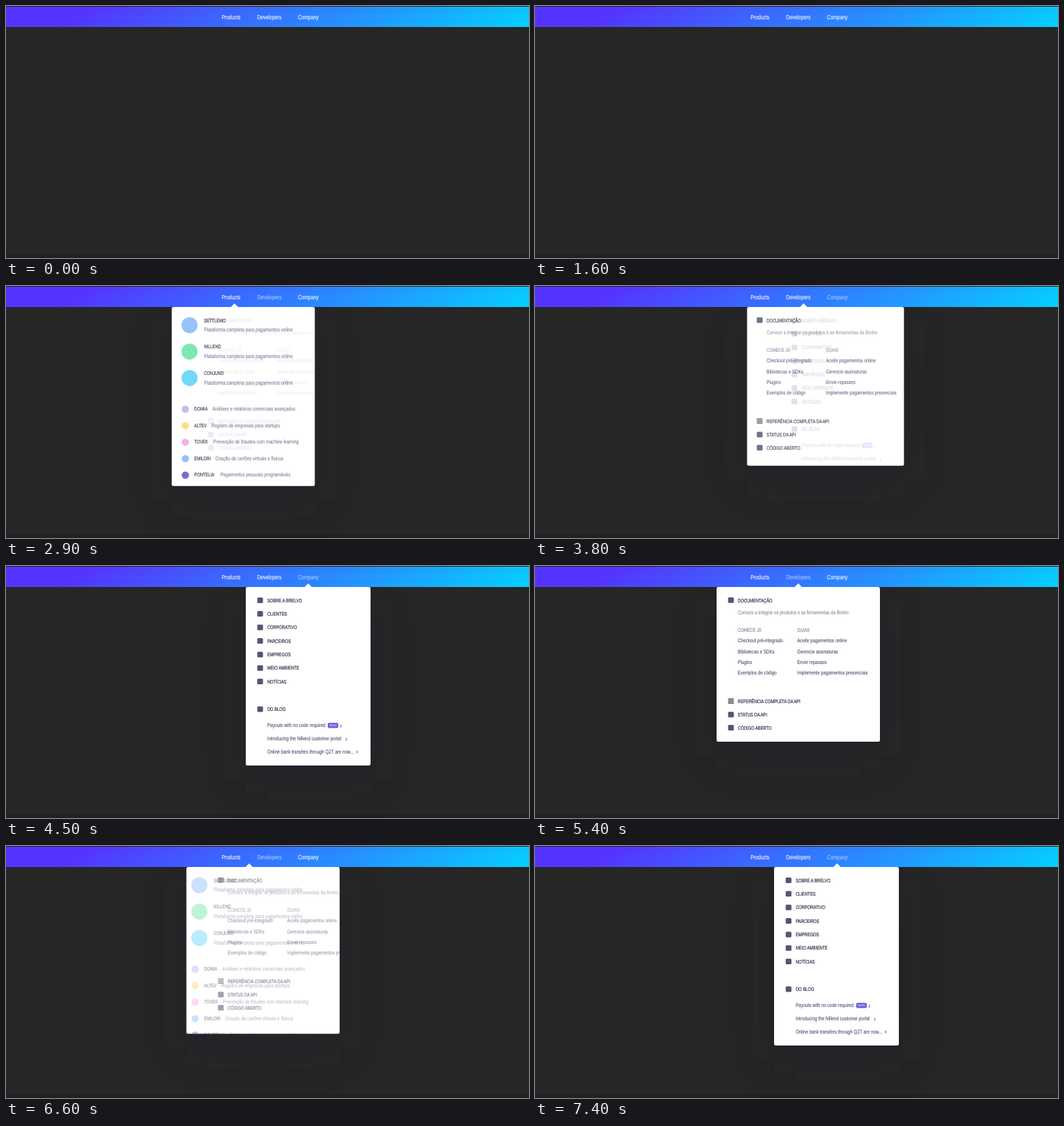
Animation of 746x360 px, one loop 7500 ms. Source, as an HTML page:

```html
<!DOCTYPE html>
<html lang="pt">
<head>
<meta charset="utf-8">
<title>Menu</title>
<style>
  html, body { margin: 0; width: 100%; height: 100%; overflow: hidden; background: #262626; }
  svg { display: block; width: 746px; height: 360px; }
  text {
    font-family: "Liberation Sans", Arial, sans-serif;
    text-rendering: geometricPrecision;
    white-space: pre;
  }
</style>
</head>
<body>
<svg id="stage" viewBox="0 0 746 360" xmlns="http://www.w3.org/2000/svg">
  <defs>
    <linearGradient id="sky" gradientUnits="userSpaceOnUse" x1="273.5" y1="-157" x2="472.5" y2="187">
      <stop offset=".15" stop-color="#53f"/>
      <stop offset="1" stop-color="#05d0ff"/>
    </linearGradient>
    <filter id="soft" filterUnits="userSpaceOnUse" x="0" y="0" width="746" height="360">
      <feGaussianBlur stdDeviation="32"/>
    </filter>
    <clipPath id="window"><rect id="clip" y="30" rx="2.5"/></clipPath>
  </defs>
  <rect width="746" height="360" fill="#262626"/>
  <rect y="355" width="746" height="5" fill="#212121"/>
  <g id="menu">
    <rect id="shadow" y="50" rx="4" fill="#1e1e32" opacity=".35" filter="url(#soft)"/>
  </g>
  <rect y="1" width="746" height="29" fill="url(#sky)"/>
  <g id="nav"></g>
  <g id="drop">
    <path id="arrow" d="M-5.5 30.5L-.8 25.6Q0 25 .8 25.6L5.5 30.5Z" fill="#fff"/>
    <rect id="panel" y="30" rx="2.5" fill="#fff"/>
    <g id="content" clip-path="url(#window)"></g>
  </g>
</svg>
<script>
const LOOP = 7500, STEP = 100, MOVE = 600, OPEN_AT = 1640, OPEN_TIME = 400, TOP = 30;
const CONDENSE = 0.78;
const INK = '#32324e', SLATE = '#525674', MUTED = '#82849c', LINK = '#46476c', DESC = '#66698a';
const $ = id => document.getElementById(id);

function add(parent, tag, attrs) {
  const node = document.createElementNS('http://www.w3.org/2000/svg', tag);
  set(node, attrs);
  parent.appendChild(node);
  return node;
}
function set(node, attrs) {
  for (const key in attrs) node.setAttribute(key, attrs[key]);
}
function label(parent, x, middle, words, fill, size = 7.9, weight = 0.08) {
  const node = add(parent, 'text', {
    transform: `translate(${x} ${middle + size * 0.35}) scale(${CONDENSE} 1)`,
    'font-size': size, fill, stroke: fill, 'stroke-width': weight
  });
  node.textContent = words;
  return node;
}
const heading = (parent, x, y, words) => label(parent, x, y, words, INK, 7.4, 0.22);
const dot = (parent, cx, cy, r, fill) => add(parent, 'circle', { cx, cy, r, fill });
const icon = (parent, y) =>
  add(parent, 'rect', { x: 16.4, y: y - 4, width: 8.2, height: 8, rx: 1.5, fill: SLATE });

// Products
function buildProducts(g) {
  [['SETTLEMO', '#8abcf8'], ['NILLEND', '#70e4ae'], ['CONJUND', '#62d4f6']].forEach(([name, color], i) => {
    const y = 49 + i * 37.7;
    dot(g, 27, y + 7, 11.5, color);
    heading(g, 47.6, y, name);
    label(g, 47.6, y + 13.6, 'Plataforma completa para pagamentos online', DESC, 8.05);
  });
  [
    ['DOMIA', 59.7, 'Análises e relatórios comerciais avançados', '#c4b1ef'],
    ['ALTEV', 58.2, 'Registro de empresas para startups', '#ffd97c'],
    ['TOVEK', 60.7, 'Prevenção de fraudes com machine learning', '#f8a6ea'],
    ['EMILDRI', 63.7, 'Criação de cartões virtuais e físicos', '#86bbf8'],
    ['PONTELIA', 71.2, 'Pagamentos pessoais programáveis', '#625dc6']
  ].forEach(([name, x, about, color], i) => {
    const y = 175.5 + i * 23.55;
    dot(g, 21, y + 0.5, 5.2, color);
    heading(g, 33.8, y, name);
    label(g, x, y, about, DESC);
  });
}

// Developers
function buildDevelopers(g) {
  icon(g, 48.7);
  heading(g, 30.3, 49, 'DOCUMENTAÇÃO');
  label(g, 30.3, 66.2, 'Comece a integrar os produtos e as ferramentas da Brelvo', MUTED, 7.8);
  [
    [30.3, 'COMECE JÁ', ['Checkout pré-integrado', 'Bibliotecas e SDKs', 'Plugins', 'Exemplos de código']],
    [115, 'GUIAS', ['Aceite pagamentos online', 'Gerencie assinaturas', 'Envie repasses',
      'Implemente pagamentos presenciais']]
  ].forEach(([x, title, links]) => {
    label(g, x, 91.4, title, MUTED, 7.4, 0.15);
    links.forEach((words, i) => label(g, x, 106.6 + i * 15.15, words, LINK));
  });
  for (let i = 0; i < 4; i++)
    add(g, 'rect', { x: 16.4, y: 189.2 + i * 2.1, width: 8.2, height: 1.3, fill: '#44465c' });
  icon(g, 212.2);
  icon(g, 231);
  ['REFERÊNCIA COMPLETA DA API', 'STATUS DA API', 'CÓDIGO ABERTO']
    .forEach((words, i) => heading(g, 30.3, 193.2 + i * 18.9, words));
}

// Company
function buildCompany(g) {
  ['SOBRE A BRELVO', 'CLIENTES', 'CORPORATIVO', 'PARCEIROS', 'EMPREGOS', 'MEIO AMBIENTE', 'NOTÍCIAS']
    .forEach((words, i) => {
      icon(g, 49 + i * 19.35);
      heading(g, 30.7, 49 + i * 19.35, words);
    });
  icon(g, 204.6);
  heading(g, 30.7, 204.6, 'DO BLOG');
  [['Payouts with no code required', 134.5], ['Introducing the Nillend customer portal', 142.3],
    ['Online bank transfers through QZT are now...', 157.8]].forEach(([words, x], i) => {
    const y = 227.7 + i * 18.9;
    label(g, 30.7, y, words, LINK);
    label(g, x, y - 0.2, '›', INK, 9, 0.2);
  });
  add(g, 'rect', { x: 117, y: 224, width: 15, height: 7.4, rx: 2, fill: '#6860dd' });
  label(g, 119.2, 227.7, 'NOVO', '#e6e4ff', 4.7);
}

const panels = [
  { name: 'Products', navX: 307.4, center: 321, width: 200.5, bottom: 290, build: buildProducts },
  { name: 'Developers', navX: 358.3, center: 375.5, width: 233, bottom: 251, build: buildDevelopers },
  { name: 'Company', navX: 416.6, center: 431, width: 178, bottom: 285, build: buildCompany }
];
for (const p of panels) {
  p.tab = label($('nav'), p.navX, 15.5, p.name, '#fff', 8.8, 0.12);
  p.group = add($('content'), 'g', {});
  p.build(p.group);
}

// start time, panel index, sideways nudge of the resting place
const moves = [[2789, 1, 0], [3660, 2, 0], [4660, 1, 0], [5460, 0, 0], [6310, 1, 0], [6820, 2, -1]];

const clamp = v => Math.max(0, Math.min(1, v));
const mix = (a, b, k) => a + (b - a) * k;
const smooth = k => k * k * (3 - 2 * k);
const glide = k => Math.sin(Math.PI / 2 * Math.pow(clamp(k / 0.58), 1.15));
const leftOf = p => p.center - p.width / 2;
const slideOut = (index, active) => index === active ? 0 : index > active ? 54.5 : -18;

function stateAt(t) {
  const first = panels[0];
  const s = {
    left: leftOf(first), width: first.width, bottom: first.bottom, arrow: first.center,
    slide: [0, 39, 54.5], fade: [1, 0, 0],
    dim: [clamp((t - OPEN_AT) / 120), 0, 0]
  };
  for (const [at, active, nudge] of moves) {
    if (t <= at) break;
    const p = panels[active], time = clamp((t - at) / MOVE);
    const k = smooth(time), resize = smooth(clamp(time / 0.9)), hover = clamp((t - at) / 100);
    s.left = mix(s.left, leftOf(p) + nudge, glide(time));
    s.width = mix(s.width, p.width, resize);
    s.bottom = mix(s.bottom, p.bottom, resize);
    s.arrow = mix(s.arrow, p.center, k);
    panels.forEach((_, i) => {
      s.slide[i] = mix(s.slide[i], slideOut(i, active), k);
      s.fade[i] = mix(s.fade[i], +(i === active), resize);
      s.dim[i] = mix(s.dim[i], +(i === active), hover);
    });
  }
  return s;
}

function draw(t) {
  const s = stateAt(t);
  const shown = smooth(clamp((t - OPEN_AT) / OPEN_TIME));
  const box = { x: s.left, width: s.width, height: s.bottom - TOP };
  for (const id of ['panel', 'clip', 'shadow']) set($(id), box);
  set($('menu'), { opacity: shown });
  set($('drop'), { opacity: shown });
  set($('arrow'), { transform: `translate(${s.arrow} 0)` });
  panels.forEach((p, i) => {
    set(p.group, { transform: `translate(${s.left + s.slide[i]} 0)`, opacity: s.fade[i] });
    set(p.tab, { opacity: 1 - 0.42 * s.dim[i] });
  });
}

function tick() {
  const t = performance.now() % LOOP;
  draw(Math.floor(t / STEP) * STEP);
  requestAnimationFrame(tick);
}
tick();
</script>
</body>
</html>
```
